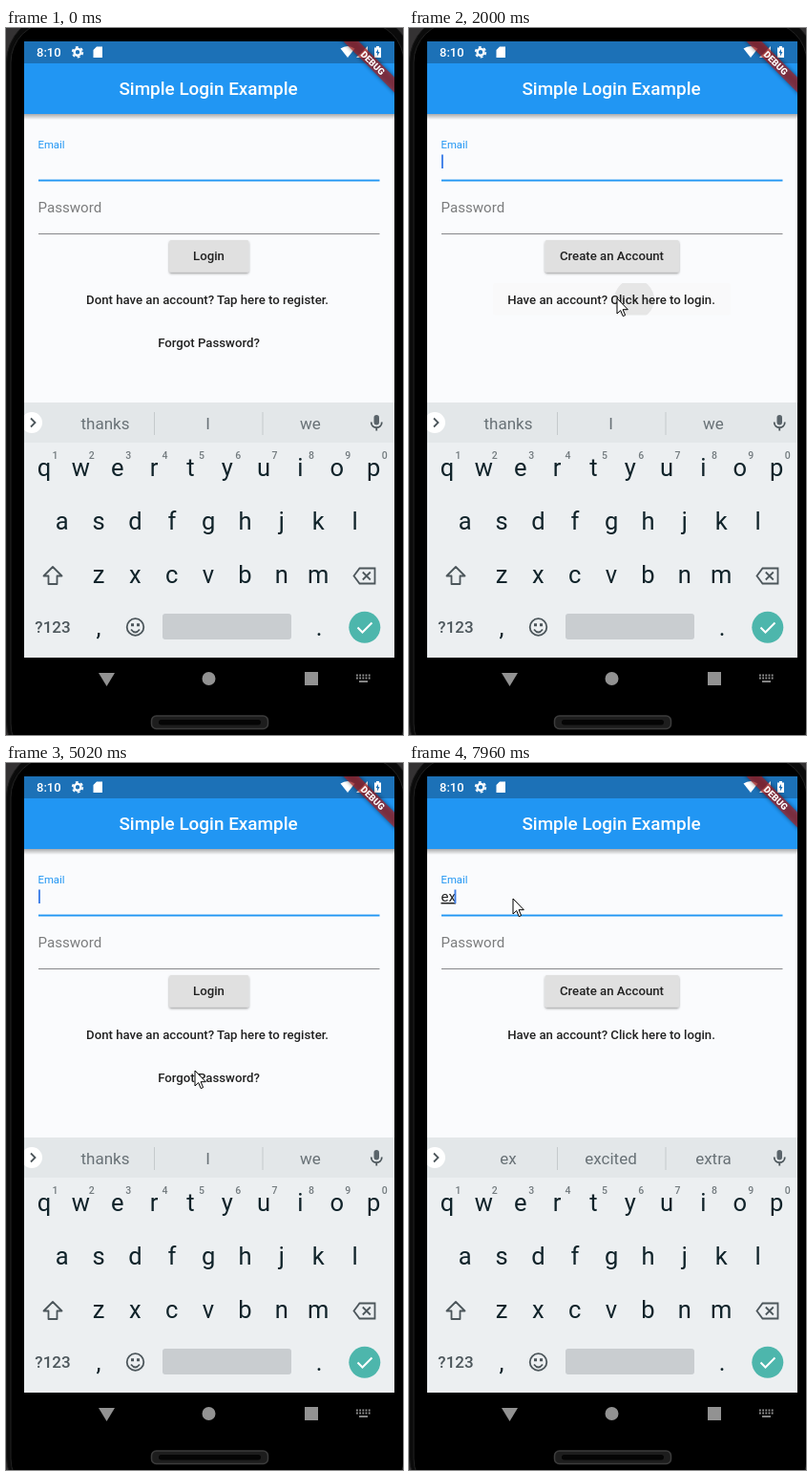
An HTML page that plays this animation: 416x740 px, repeating every 8000 ms.

```html
<!DOCTYPE html>
<html lang="en">
<head>
<meta charset="utf-8">
<title>Login form</title>
<style>
  html, body { margin: 0; width: 100%; height: 100%; overflow: hidden; background: #000; }
  svg { display: block; font-family: Roboto, sans-serif; }
  .mid { text-anchor: middle; }
  .strong { font-size: 13.2px; font-weight: 500; fill: #212121; text-anchor: middle; }
  .word { font-size: 17px; fill: #687176; text-anchor: middle; }
  .key { font-size: 25.5px; fill: #10232a; text-anchor: middle; }
  .digit { font-size: 10.5px; font-weight: 500; fill: #737b7f; text-anchor: middle; }
  .line { fill: none; stroke: #4c565b; stroke-width: 1.8; }
</style>
</head>
<body>
<svg width="416" height="740" viewBox="0 0 416 740">
  <defs>
    <clipPath id="screen"><path d="M19 14H407V659H19Z"/></clipPath>
    <clipPath id="linkArea"><path d="M76 267H349V300.5H76Z"/></clipPath>
    <linearGradient id="barShadow" x2="0" y2="1">
      <stop stop-color="#000" stop-opacity=".32"/>
      <stop offset="1" stop-color="#000" stop-opacity="0"/>
    </linearGradient>
    <filter id="lift" x="-10%" y="-30%" width="120%" height="170%">
      <feDropShadow dx="0" dy="1.5" stdDeviation="1.2" flood-opacity=".38"/>
    </filter>
    <filter id="blur" x="-20%" y="-80%" width="140%" height="260%"><feGaussianBlur stdDeviation="2.5"/></filter>
  </defs>

  <!-- phone body -->
  <rect width="416" height="740" fill="#343233"/>
  <rect x=".5" y="-14" width="424" height="790" rx="50" fill="#0b0b0b" stroke="#1c1c1c"/>
  <rect x="5" y="-6" width="412" height="776" rx="42" fill="#000" stroke="#222"/>
  <rect x="152.5" y="720" width="122" height="13.5" rx="5" fill="#1d1d1d" stroke="#3c3c3c" stroke-width="1.5"/>
  <rect x="160" y="724" width="107" height="5.5" rx="2.7" fill="#050505"/>

  <g clip-path="url(#screen)">
    <rect x="19" y="14" width="388" height="645" fill="#fafbfd"/>
    <rect x="19" y="90" width="388" height="6" fill="url(#barShadow)"/>
    <rect x="19" y="37" width="388" height="53" fill="#2196f3"/>
    <rect x="19" y="14" width="388" height="23" fill="#1c71b7"/>
    <text class="mid" x="212" y="70" font-size="18.9" font-weight="500" fill="#fff">Simple Login Example</text>

    <!-- status bar -->
    <g fill="#fff">
      <text x="32" y="30" font-size="13" font-weight="500">8:10</text>
      <circle cx="75" cy="25.3" r="3.4" fill="none" stroke="#fff" stroke-width="2.4"/>
      <circle cx="75" cy="25.3" r="5.3" fill="none" stroke="#fff" stroke-width="1.8" stroke-dasharray="2.8 2.75"/>
      <path d="M95 19.5H101V31H91.500V23Z"/>
      <path d="M350.500 21.500Q358 16.500 365.500 21.500L358 31Z"/>
      <path d="M379 19V31H367Z"/>
      <path d="M386 20.500H388V19H391V20.500H393V31H386Z"/>
      <path d="M390 22L387.500 26H389V29.500L391.500 25H390Z" fill="#1c71b7"/>
    </g>
    <g transform="translate(407 14) rotate(45) scale(.944)">
      <rect x="-45" y="28" width="90" height="12" opacity=".5" filter="url(#blur)"/>
      <rect x="-45" y="28" width="90" height="12" fill="#b71c1c" opacity=".627"/>
      <text class="mid" y="37.600" font-size="10.2" font-weight="900" fill="#fff">DEBUG</text>
    </g>

    <!-- form -->
    <text x="33.500" y="126" font-size="11.3" fill="#2196f3">Email</text>
    <text x="33.500" y="193.200" font-size="15.1" fill="#7b7c7d">Password</text>
    <rect x="34" y="158.600" width="357.500" height="1.900" fill="#2196f3"/>
    <rect x="34" y="215" width="357.500" height="1" fill="#86878a"/>
    <text id="typed" x="33.500" y="145" font-size="15.1" fill="#212121" text-decoration="underline"></text>
    <rect id="caret" y="132.500" width="1.900" height="14.500" fill="#3f7fe8"/>
    <rect id="highlight" x="88" y="267" width="249" height="33.500" rx="2"/>
    <g clip-path="url(#linkArea)"><circle id="ripple" cy="284" fill="#000" opacity=".08"/></g>
    <g id="loginPage">
      <rect x="171" y="222" width="83.500" height="33.500" rx="2" fill="#e0e0e0" filter="url(#lift)"/>
      <text class="strong" x="212.500" y="243.300">Login</text>
      <text class="strong" x="211" y="288.500">Dont have an account? Tap here to register.</text>
      <text class="strong" x="212.500" y="333.800">Forgot Password?</text>
    </g>
    <g id="createPage">
      <rect x="142.500" y="222" width="140.500" height="33.500" rx="2" fill="#e0e0e0" filter="url(#lift)"/>
      <text class="strong" x="212.500" y="243.300">Create an Account</text>
      <text class="strong" x="212" y="288.500">Have an account? Click here to login.</text>
    </g>

    <!-- keyboard -->
    <rect x="19" y="392" width="388" height="267" fill="#eceff1"/>
    <rect x="19" y="392" width="388" height="42" fill="#e3e7e9"/>
    <path d="M155.500 402V426M269 402V426" stroke="#c5cacc"/>
    <circle cx="27" cy="413" r="11" fill="#fff"/>
    <path class="line" d="M26 408.500L30.500 413L26 417.500" stroke="#263238"/>
    <g id="suggestions"></g>
    <rect x="385.500" y="405" width="5.500" height="10.500" rx="2.750" fill="#5a646a"/>
    <path class="line" d="M382.700 412.500C382.700 420 393.800 420 393.800 412.500M388.250 418V421.500" stroke-width="1.500"/>
    <g id="keys"></g>
    <path class="line" d="M49 564L39.500 573.500H44.500V582H53.500V573.500H58.500Z" stroke-linejoin="round"/>
    <path class="line" d="M370.500 565.500H386.500V581.500H370.500L364.500 573.500ZM373.800 569.500L381.800 577.500M381.800 569.500L373.800 577.500"/>
    <text class="mid" x="49" y="633" font-size="17" font-weight="500" fill="#4c565b">?123</text>
    <circle class="line" cx="135.500" cy="627" r="8.800"/>
    <path class="line" d="M131 629.500Q135.500 635.500 140 629.500"/>
    <path d="M131 623.200h3v3h-3zM137 623.200h3v3h-3z" fill="#4c565b"/>
    <rect x="164" y="613" width="135" height="27" rx="3" fill="#c9cdd0"/>
    <circle cx="375.800" cy="627.300" r="16.500" fill="#4db6ac"/>
    <path d="M368.500 627.500L373.500 632.500L383.500 622.500" fill="none" stroke="#fff" stroke-width="2"/>
  </g>

  <!-- navigation bar -->
  <g fill="#929292">
    <path d="M97 675H114L105.500 689Z"/>
    <circle cx="212.500" cy="681" r="7"/>
    <rect x="313" y="674" width="14" height="14"/>
    <path d="M367 677.500H382M367 680.500H382" stroke="#929292" stroke-width="1.800" stroke-dasharray="1.800 1.400"/>
    <path d="M370 684H379" stroke="#929292" stroke-width="1.800"/>
  </g>
  <path id="pointer" d="M0 0V16L3.700 12.600L6.200 18.600L8.600 17.600L6.100 11.700H11.300Z" fill="#fff" stroke="#000"/>
</svg>
<script>
const LOOP = 8000;
const $ = id => document.getElementById(id);
const set = (id, attrs) => Object.entries(attrs).forEach(([k, v]) => $(id).setAttribute(k, v));
const show = (id, on) => set(id, { visibility: on ? 'visible' : 'hidden' });

function addText(parent, cls, x, y, content = '') {
  const node = document.createElementNS('http://www.w3.org/2000/svg', 'text');
  node.setAttribute('class', cls);
  node.setAttribute('x', x);
  node.setAttribute('y', y);
  node.textContent = content;
  $(parent).append(node);
  return node;
}

const PITCH = 38.35;
[['qwertyuiop', 40, 469], ['asdfghjkl', 58.8, 525], ['zxcvbnm', 97, 580.5], [',', 97, 636], ['.', 328, 636]]
  .forEach(([row, x, y]) => [...row].forEach((c, i) => addText('keys', 'key', x + i * PITCH, y, c)));
[...'1234567890'].forEach((c, i) => addText('keys', 'digit', 51.5 + i * PITCH, 451, c));
const words = [104, 211.5, 319].map(x => addText('suggestions', 'word', x, 419.5));

// time, x, y of the pointer tip
const path = [
  [210, 311, 735], [1160, 225, 273], [1500, 225, 273], [1780, 218, 283], [2480, 218, 283],
  [2770, 215, 290], [2880, 215, 290], [3000, 214, 296], [3100, 214, 296], [3230, 214, 303],
  [3400, 214, 303], [3860, 211, 283], [4350, 211, 283], [4640, 198, 322], [5340, 198, 322],
  [5800, 189, 292], [5980, 189, 292], [6180, 188, 286], [6420, 188, 286], [6500, 189, 286],
  [6680, 189, 286], [7120, 109, 142], [LOOP, 109, 142]
];

function pointerAt(t) {
  const i = Math.max(1, path.findIndex(p => p[0] > t));
  const [t0, x0, y0] = path[i - 1], [t1, x1, y1] = path[i];
  const p = Math.max(0, (t - t0) / (t1 - t0));
  const e = p * p * (3 - 2 * p);
  return [x0 + (x1 - x0) * e, y0 + (y1 - y0) * e];
}

// start, end, centre x, radius
const ripples = [[2000, 2230, 236, 21], [4090, 4240, 190, 28], [6660, 6810, 208, 24]];

// start, typed text, suggestions
const typing = [
  [0, '', 'thanks I we'],
  [7730, 'e', 'e even every'],
  [7960, 'ex', 'ex excited extra']
];

function draw(t) {
  const creating = (t >= 2000 && t < 4090) || t >= 6660;
  show('loginPage', !creating);
  show('createPage', creating);
  show('highlight', t >= 2000 && t < 4090);
  set('highlight', { fill: t < 4010 ? '#f9f9fa' : '#f5f5f6' });

  const ripple = ripples.find(r => t >= r[0] && t < r[1]);
  show('ripple', ripple);
  if (ripple) set('ripple', { cx: ripple[2], r: ripple[3] });

  const [, text, options] = typing.findLast(s => t >= s[0]);
  $('typed').textContent = text;
  options.split(' ').forEach((w, i) => words[i].textContent = w);
  const complete = text === 'ex';
  show('caret', complete || (t >= 70 && t % 1000 < 500));
  set('caret', { x: complete ? 47.5 : 34 });

  show('pointer', t >= 290);
  set('pointer', { transform: `translate(${pointerAt(t)})` });
}

const start = performance.now();
function tick() {
  draw((performance.now() - start) % LOOP);
  requestAnimationFrame(tick);
}
tick();
</script>
</body>
</html>
```
